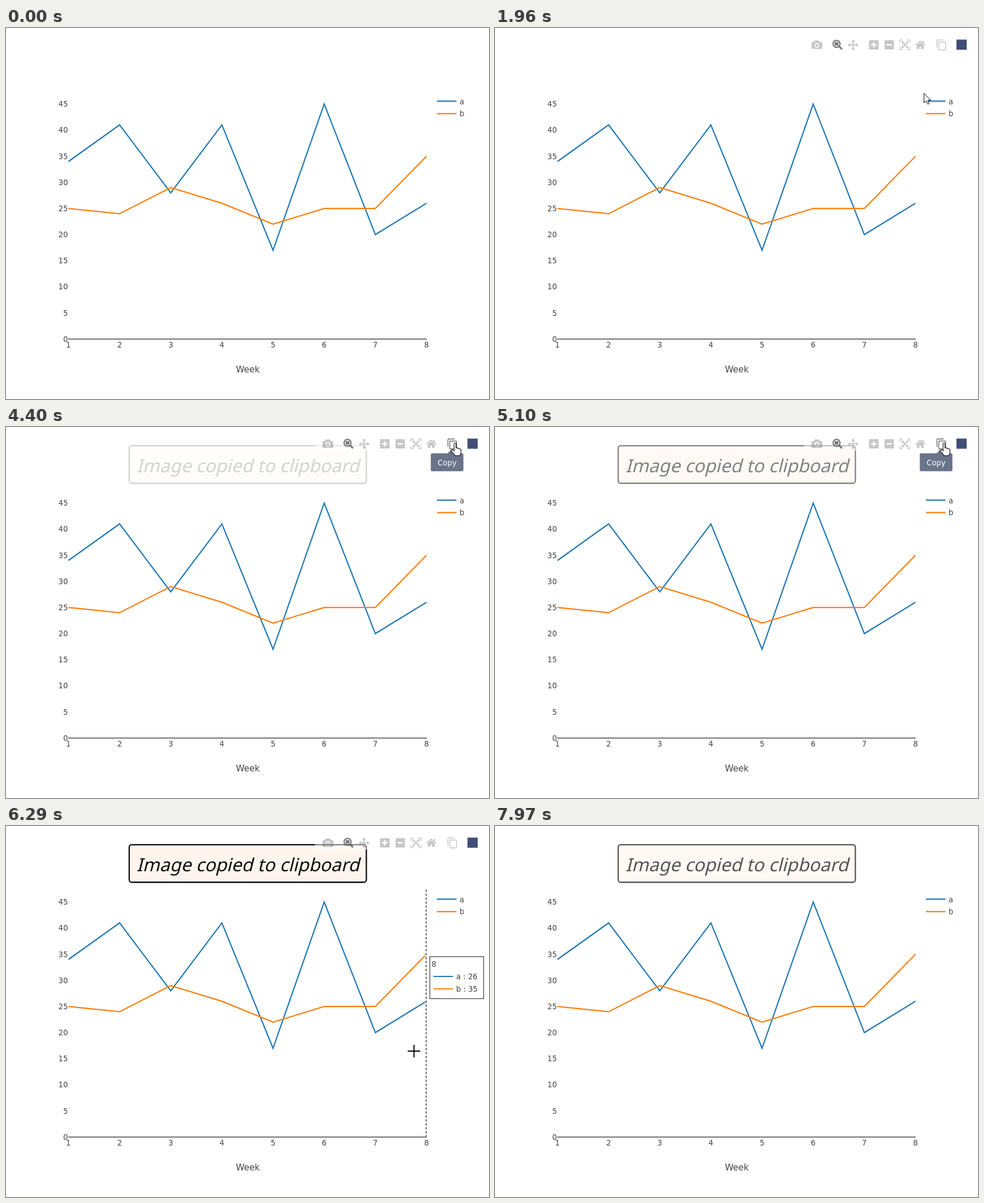
An HTML page that plays this animation: 853x656 px, repeating every 8 s.

```html
<!DOCTYPE html>
<html lang="en">
<head>
<meta charset="utf-8">
<title>Line chart with copy button</title>
<style>
  html, body { margin: 0; width: 100%; height: 100%; overflow: hidden; background: #fff; }
  svg { display: block; font: 13.2px "DejaVu Sans", sans-serif; fill: #444; }
  .line { fill: none; stroke-width: 2.2; }
  .a { stroke: #1f77b4; }
  .b { stroke: #ff7f0e; }
  .icon { opacity: .3; }
  .stroke { fill: none; stroke: #444; }
</style>
</head>
<body>
<svg width="853" height="656" viewBox="0 0 853 656">
  <g id="chart">
    <path d="M110 550H743" stroke="#444" stroke-width="1.5"/>
    <text x="427" y="609" text-anchor="middle" font-size="15.4">Week</text>
    <path class="line a" d="M761 129.3h34.5"/><text x="801" y="134.5">a</text>
    <path class="line b" d="M761 151.3h34.5"/><text x="801" y="156.3">b</text>
  </g>

  <g id="hover">
    <path d="M742 112.5V549" stroke="#fff" stroke-width="3.3"/>
    <path d="M742 112.5V549" stroke="#444" stroke-width="1.65" stroke-dasharray="4 3"/>
    <rect x="748.5" y="231" width="95" height="74.3" fill="#fff" stroke="#444" stroke-width="1.3"/>
    <text x="751.5" y="249">8</text>
    <path class="line a" d="M755 266h34.5"/><text x="795" y="271">a : 26</text>
    <path class="line b" d="M755 288h34.5"/><text x="795" y="293">b : 35</text>
  </g>

  <g id="notice">
    <rect x="217.6" y="33.1" width="418.8" height="66.4" rx="4.5" fill="#fff5ee" stroke="#000" stroke-width="2.3"/>
    <text transform="translate(230.5 80) skewX(-14)" fill="#000" style="font: 32px 'Noto Sans', sans-serif">Image copied to clipboard</text>
  </g>

  <g id="modebar">
    <rect x="545.5" y="17" width="297" height="25" fill="#fff" opacity=".5"/>
    <path class="icon" fill-rule="evenodd" d="M561 24.8h2.6l1.2-2.8h7.4l1.2 2.8h2.6q2 0 2 2v8.2q0 2-2 2h-15q-2 0-2-2v-8.2q0-2 2-2zM564.3 30.7a4.2 4.2 0 1 0 8.4 0a4.2 4.2 0 1 0-8.4 0zM566 30.7a2.5 2.5 0 1 0 5 0a2.5 2.5 0 1 0-5 0z"/>
    <g class="icon" style="opacity:.7">
      <circle class="stroke" cx="603.2" cy="28" r="6.1" stroke-width="2.4"/>
      <path class="stroke" d="M607.8 32.7l5 5" stroke-width="3.2"/>
      <rect x="600" y="24.8" width="6.4" height="6.4"/>
    </g>
    <g class="icon">
      <path class="stroke" d="M626 30h13M632.5 23.5v13" stroke-width="2"/>
      <path d="M623 30l4-3.6v7.2zM642 30l-4-3.6v7.2zM632.5 20.5l-3.6 4h7.2zM632.5 39.5l-3.6-4h7.2z"/>
    </g>
    <path class="icon" fill-rule="evenodd" d="M661.5 21.5h15q1 0 1 1v14.6q0 1-1 1h-15q-1 0-1-1V22.500q0-1 1-1zM667.800 25v3.600h-3.600v2.400h3.600v3.600h2.400v-3.600h3.600v-2.400h-3.600v-3.600z"/>
    <path class="icon" fill-rule="evenodd" d="M689 21.500h14.500q1 0 1 1v14.600q0 1-1 1h-14.500q-1 0-1-1V22.500q0-1 1-1zM691.500 28.600v2.400h9.500v-2.400z"/>
    <g class="icon">
      <path class="stroke" d="M715.300 26v-4.700h4.700M728 21.300h4.700v4.700M732.700 33.500v4.700h-4.700M720 38.200h-4.700v-4.700" stroke-width="1.500"/>
      <path class="stroke" d="M720 25.700l8 8M728 25.700l-8 8" stroke-width="2"/>
      <path d="M718 23.700h4.500l-4.500 4.500zM730 23.700v4.500l-4.500-4.500zM718 35.700v-4.500l4.500 4.500zM730 35.700h-4.500l4.500-4.500z"/>
    </g>
    <g class="icon">
      <path class="stroke" d="M742.600 30.700l8.400-7.200l8.400 7.200" stroke-width="1.800"/>
      <path d="M755 23h2.300v5l-2.300-2zM745 31l6-5.200l6 5.200v6h-4.400v-4.300h-3.200v4.300h-4.400z"/>
    </g>
    <g class="icon" id="copy">
      <rect class="stroke" x="783.700" y="24.700" width="12" height="14" rx="1" stroke-width="1.400"/>
      <path class="stroke" d="M780.500 35V22.500q0-1.300 1.300-1.300H792.500" stroke-width="1.400"/>
    </g>
    <rect x="815" y="20.500" width="18" height="18" fill="#3f4f75"/>
    <g id="tooltip" fill="#69738a">
      <rect x="750.200" y="46.500" width="57.600" height="31.800" rx="2.200"/>
      <path d="M779.500 47l6.500-6.500l6.500 6.500z"/>
      <text x="779" y="67.500" text-anchor="middle" fill="#fff">Copy</text>
    </g>
  </g>

  <circle id="click" cx="793" cy="27.500" r="13.500" fill="#ff0" opacity=".47"/>
  <g id="pointer" stroke-linejoin="round">
    <path id="cross" d="M-11 0H11M0-11V11" stroke="#000" stroke-width="2"/>
    <path id="arrow" d="M0 0V17l4-3.700l2.600 6l2.600-1.100l-2.600-5.900h5.400z" fill="#fff" stroke="#000"/>
    <path id="hand" d="M-1.700 1.500q1.700-3 3.400 0v7.500l1.300-.5q1.600 0 1.900 1.400q2.300-.9 3 .9q2.500-.3 2.600 1.800v4.200q0 3.700-2.500 6h-8q-1.800-3.200-6-7.400q-2.100-2.900.6-3.200q1.600 0 3.700 2.100z" fill="#fff" stroke="#000" stroke-width="1.100"/>
  </g>
</svg>
<script>
const LOOP = 8000;
const $ = id => document.getElementById(id);
const clamp = v => Math.min(1, Math.max(0, v));
const smooth = v => (v = clamp(v), v * v * (3 - 2 * v));
const show = (id, on) => $(id).style.display = on ? '' : 'none';

const chart = $('chart');
function add(tag, attrs, content = '') {
  const el = document.createElementNS('http://www.w3.org/2000/svg', tag);
  for (const key in attrs) el.setAttribute(key, attrs[key]);
  el.textContent = content;
  chart.append(el);
}

const xOf = i => 110.3 + i * 90.33;
const yOf = v => 550 - v * 9.235;
for (let v = 0; v <= 45; v += 5) add('text', { x: 109.3, y: yOf(v) + 4.8, 'text-anchor': 'end' }, v);
for (let i = 0; i < 8; i++) add('text', { x: xOf(i), y: 565, 'text-anchor': 'middle' }, i + 1);

const series = {
  a: [34, 41, 28, 41, 17, 45, 20, 26],
  b: [25, 24, 29, 26, 22, 25, 25, 35]
};
for (const name in series) {
  add('polyline', { class: 'line ' + name, points: series[name].map((v, i) => [xOf(i), yOf(v)]).join(' ') });
}

// Pointer keys: time, x, y
const route = [
  [790, 832, 236], [1140, 731, 209], [1540, 731, 209], [1900, 752, 130], [2310, 790, 32],
  [2450, 796, 26], [2650, 793, 28], [5900, 793, 28], [6100, 742, 170], [6420, 706, 552],
  [6570, 702, 600], [6800, 694, 670]
];
function pointerAt(t) {
  const i = route.findIndex(key => key[0] > t);
  if (i < 1) return null;
  const [t0, x0, y0] = route[i - 1], [t1, x1, y1] = route[i];
  const k = (t - t0) / (t1 - t0);
  return [x0 + (x1 - x0) * k, y0 + (y1 - y0) * k];
}

function draw(t) {
  const pos = pointerAt(t);
  const [x, y] = pos || [-99, -99];
  const inPlot = x > 110 && x < 743 && y > 112 && y < 550;
  const onCopy = x > 778 && x < 799 && y > 18 && y < 42;

  show('pointer', pos);
  $('pointer').setAttribute('transform', `translate(${x} ${y})`);
  show('cross', inPlot);
  show('hand', onCopy);
  show('arrow', !inPlot && !onCopy);
  show('hover', inPlot);
  show('tooltip', onCopy);
  show('click', t >= 3310 && t < 3510);
  $('copy').style.opacity = onCopy ? .8 : .3;
  $('modebar').style.opacity = smooth((t - 790) / 300) - smooth((t - 6850) / 330);
  $('notice').style.opacity = smooth((t - 3600) / 3060) - smooth((t - 6780) / 3050);
}

const start = performance.now();
function frame() {
  draw((performance.now() - start) % LOOP);
  requestAnimationFrame(frame);
}
draw(0);
requestAnimationFrame(frame);
</script>
</body>
</html>
```
